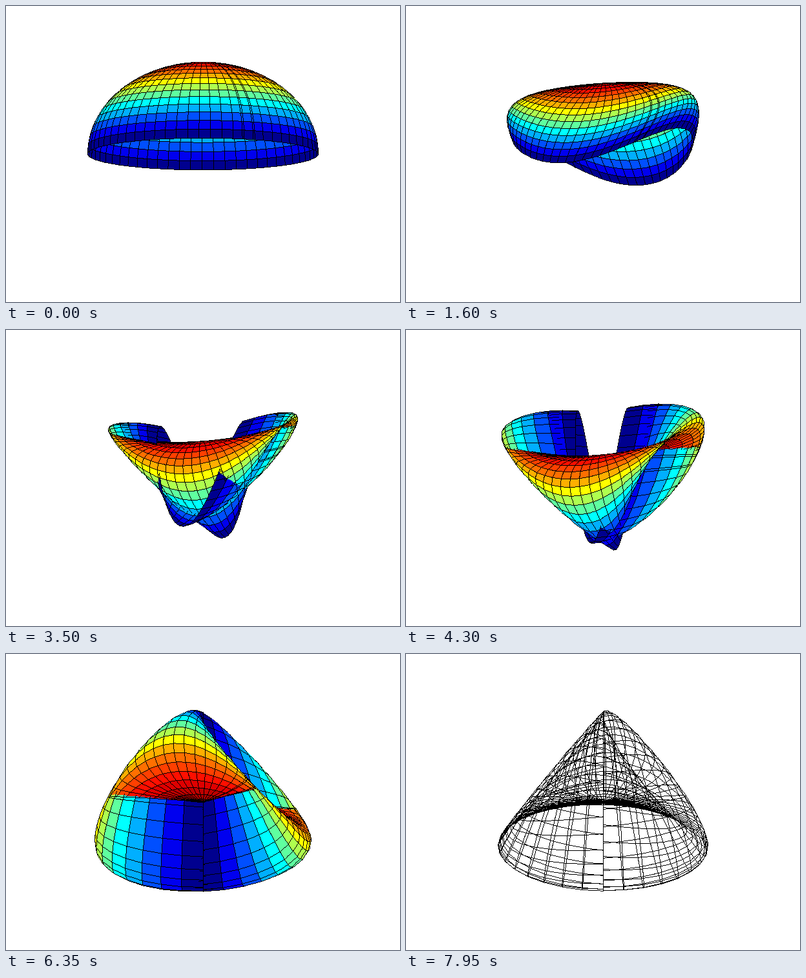
Write an HTML page with a canvas that moves like this. It is 610 by 460 pixels and loops after 8000 ms.

```html
<!DOCTYPE html>
<html lang="en">
<head>
<meta charset="utf-8">
<title>Hemisphere folding into a Roman surface</title>
<style>
  html, body { margin: 0; width: 100%; height: 100%; overflow: hidden; background: #fff; }
  canvas { display: block; width: 610px; height: 460px; }
</style>
</head>
<body>
<canvas id="stage" width="610" height="460"></canvas>
<script>
const WIDTH = 610, HEIGHT = 460;
const LOOP = 8000, TICK = 50;
const ROWS = 16, COLS = 64, CELL = 0.1;
const ELEVATION = -10 * Math.PI / 180;
const BLACK = 0xff000000, WHITE = 0xffffffff;
const LINE_BIAS = 0.02;

const ctx = document.getElementById('stage').getContext('2d');
const image = ctx.createImageData(WIDTH, HEIGHT);
const pixels = new Uint32Array(image.data.buffer);
const depth = new Float32Array(WIDTH * HEIGHT);
const clamp = (value, low, high) => Math.min(high, Math.max(low, value));

// Rainbow colour map with 64 levels, packed as ABGR.
function rainbow(value) {
  const level = Math.floor(value * 61.5) + 1;
  const channel = peak => Math.floor(255 * clamp((24 - Math.abs(level - peak)) / 16, 0, 1));
  return (255 << 24 | channel(16) << 16 | channel(32) << 8 | channel(48)) >>> 0;
}
const bandColors = Array.from({ length: ROWS }, (_, row) => rainbow(Math.sin(row * CELL)));

// Blend of the hemisphere (x, y, z) at t = 0 and the Roman surface 2(yz, xz, xy) at t = 1.
function surfacePoint(lat, lon, t) {
  const x = Math.cos(lat) * Math.cos(lon);
  const y = Math.cos(lat) * Math.sin(lon);
  const z = Math.sin(lat);
  const mix = (from, to) => (1 - t) * from + t * to;
  return [mix(x, 2 * y * z), mix(y, 2 * x * z), mix(z, 2 * x * y)];
}

// Orthographic view whose bounding cube is stretched to fill the same area.
function makeCamera(degrees) {
  const az = degrees * Math.PI / 180;
  const c = Math.cos(az), s = Math.sin(az);
  const ce = Math.cos(ELEVATION), se = Math.sin(ELEVATION);
  const spread = Math.abs(c) + Math.abs(s);
  const scaleX = 229 / spread;
  const scaleY = 172.6 / (ce + spread * Math.abs(se));
  return ([x, y, z]) => {
    const near = x * s - y * c;
    return [
      305 + scaleX * (x * c + y * s),
      230 - scaleY * (z * ce - near * se),
      near * ce + z * se
    ];
  };
}

function fillTriangle(a, b, c, color) {
  const area = (b[0] - a[0]) * (c[1] - a[1]) - (b[1] - a[1]) * (c[0] - a[0]);
  if (Math.abs(area) < 1e-9) return;
  const left = Math.floor(Math.min(a[0], b[0], c[0]));
  const right = Math.ceil(Math.max(a[0], b[0], c[0]));
  const top = Math.floor(Math.min(a[1], b[1], c[1]));
  const bottom = Math.ceil(Math.max(a[1], b[1], c[1]));
  for (let py = top; py < bottom; py++) {
    for (let px = left; px < right; px++) {
      const x = px + 0.5 - a[0], y = py + 0.5 - a[1];
      const u = (x * (c[1] - a[1]) - y * (c[0] - a[0])) / area;
      const v = (y * (b[0] - a[0]) - x * (b[1] - a[1])) / area;
      if (u < 0 || v < 0 || u + v > 1) continue;
      const d = a[2] + u * (b[2] - a[2]) + v * (c[2] - a[2]);
      const at = py * WIDTH + px;
      if (d > depth[at]) {
        depth[at] = d;
        pixels[at] = color;
      }
    }
  }
}

function drawLine(a, b, seeThrough) {
  const dx = b[0] - a[0], dy = b[1] - a[1], dd = b[2] - a[2];
  const steps = Math.max(1, Math.ceil(Math.max(Math.abs(dx), Math.abs(dy))));
  for (let i = 0; i <= steps; i++) {
    const k = i / steps;
    const at = Math.floor(a[1] + dy * k) * WIDTH + Math.floor(a[0] + dx * k);
    if (seeThrough || a[2] + dd * k + LINE_BIAS >= depth[at]) pixels[at] = BLACK;
  }
}

function render(t, azimuth, wireframe) {
  const project = makeCamera(azimuth);
  const grid = Array.from({ length: ROWS + 1 }, (_, row) =>
    Array.from({ length: COLS + 1 }, (_, col) =>
      project(surfacePoint(row * CELL, col * CELL, t))));

  pixels.fill(WHITE);
  depth.fill(-1e3);

  if (!wireframe) {
    for (let row = 0; row < ROWS; row++) {
      for (let col = 0; col < COLS; col++) {
        const a = grid[row][col], b = grid[row][col + 1];
        const c = grid[row + 1][col + 1], d = grid[row + 1][col];
        fillTriangle(a, b, c, bandColors[row]);
        fillTriangle(a, c, d, bandColors[row]);
      }
    }
  }
  for (let row = 0; row <= ROWS; row++) {
    for (let col = 0; col <= COLS; col++) {
      if (col < COLS) drawLine(grid[row][col], grid[row][col + 1], wireframe);
      if (row < ROWS) drawLine(grid[row][col], grid[row + 1][col], wireframe);
    }
  }
  ctx.putImageData(image, 0, 0);
}

let shown = -1;
function play() {
  const tick = Math.floor(performance.now() % LOOP / TICK);
  if (tick !== shown) {
    shown = tick;
    const fold = clamp((tick - 10) / 100, 0, 1);
    const turn = Math.max(0, tick - 111);
    // The first half turn is solid, the rest a wireframe.
    render(fold, 70 + 5 * turn, turn >= 36);
  }
  requestAnimationFrame(play);
}
play();
</script>
</body>
</html>
```
